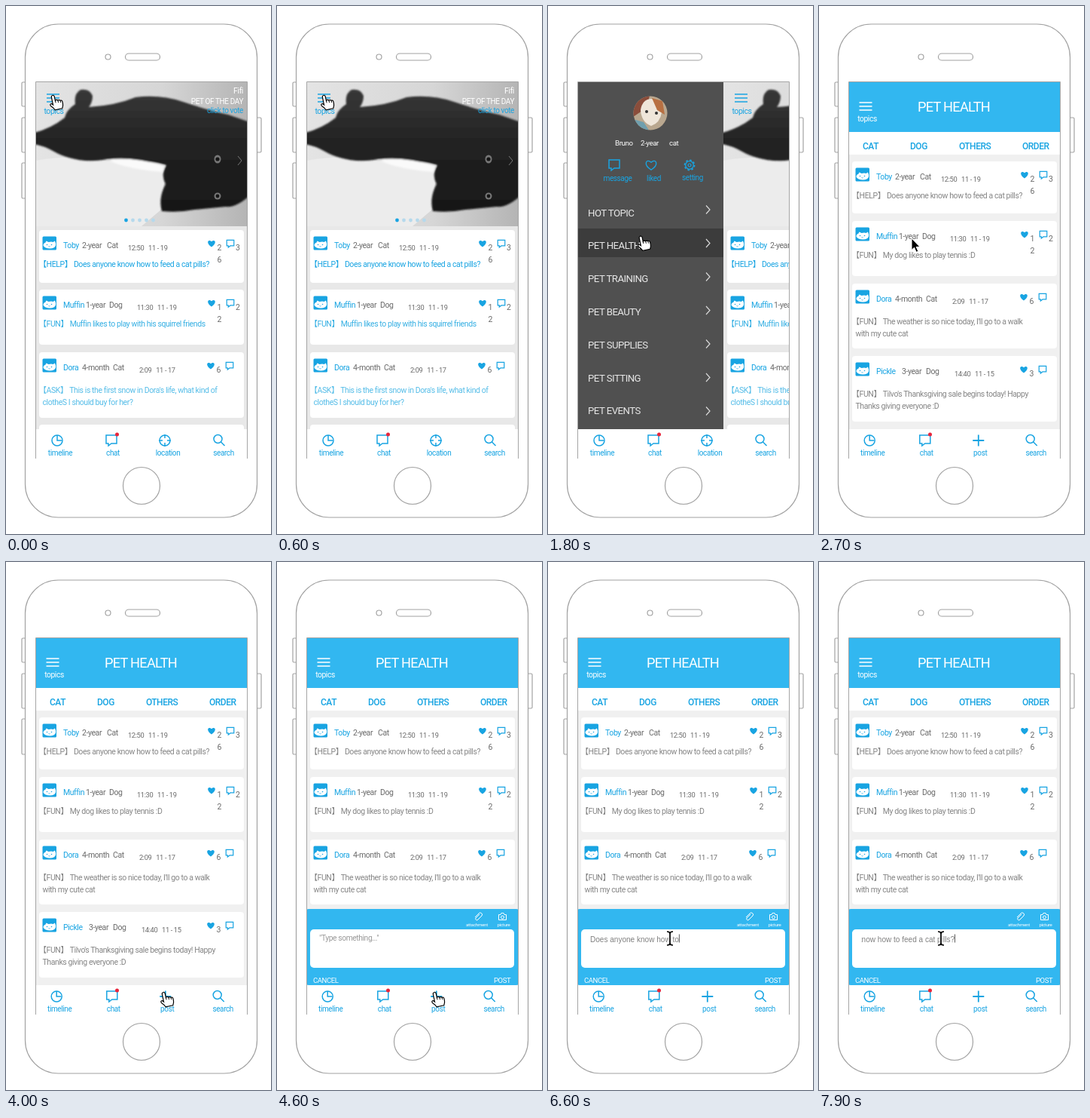
These frames come from a looping animation (352x700 px, 8000 ms). An HTML page:

```html
<!DOCTYPE html>
<html lang="en">
<head>
<meta charset="utf-8">
<title>Pet community app</title>
<style>
  html, body { margin: 0; width: 100%; height: 100%; overflow: hidden; background: #fff; }
  svg { display: block; width: 352px; height: 700px; }
  text { font-family: Roboto, "Noto Sans CJK SC", "Noto Sans CJK JP", sans-serif; letter-spacing: -.04em; white-space: pre; }
  .typed { font-family: "Liberation Sans", Arial, sans-serif; letter-spacing: 0; }
</style>
</head>
<body>
<svg id="stage" viewBox="0 0 352 700" xmlns="http://www.w3.org/2000/svg"></svg>
<script>
const LOOP = 8000, MENU_WIDTH = 194;
const BLUE = '#18a4e2', SKY = '#32b7f0', GREY = '#6a6a6a';
const QUESTION = 'Does anyone know how to feed a cat pills?';

const text = (x, y, str, fill = BLUE, size = 10.5, attrs = '') =>
  `<text x="${x}" y="${y}" fill="${fill}" font-size="${size}" ${attrs}>${str}</text>`;
const centred = (x, y, str, fill, size) => text(x, y, str, fill, size, 'text-anchor="middle"');
const box = (x, y, w, h, fill, r = 0) =>
  `<rect x="${x}" y="${y}" width="${w}" height="${h}" rx="${r}" fill="${fill}"/>`;
const line = (d, stroke = BLUE, width = 1.5) =>
  `<path d="${d}" fill="none" stroke="${stroke}" stroke-width="${width}"/>`;
const shape = (d, fill) => `<path d="${d}" fill="${fill}"/>`;
const disc = (x, y, r, fill) => `<circle cx="${x}" cy="${y}" r="${r}" fill="${fill}"/>`;
const ring = (x, y, r, stroke = BLUE, width = 1.5) =>
  `<circle cx="${x}" cy="${y}" r="${r}" fill="none" stroke="${stroke}" stroke-width="${width}"/>`;
const at = (x, y, body, scale = 1) => `<g transform="translate(${x} ${y}) scale(${scale})">${body}</g>`;

const HEART = 'M0 5C-9-1-5-7.5 0-3 5-7.5 9-1 0 5Z';
const BUBBLE = 'M-7-6H7V5H0L-4 8V5H-7Z';

const burger = (x, y, stroke) => line(`M${x} ${y}h17m-17 5h17m-17 5h17`, stroke, 1.6);

const face = box(0, 0, 18.5, 18, BLUE, 1.5) +
  shape('M1 12Q1 9 4 8L5 6 8 7.5Q12 6.5 14 7.5L16.5 6Q18 9 17.5 12 16 16 10 16 3 16 1 12Z', '#fff') +
  disc(6, 11, .8, BLUE) + disc(12, 11, .8, BLUE) + line('M8 13q1 1 2 0', BLUE, .8);

function card(top, height, post, fill) {
  const [name, age, ageX, kind, kindX, time, timeX, likes, comments, ...lines] = post;
  const first = top + (lines.length > 1 ? 54 : 49);
  const heartX = likes.length > 1 ? 273 : 272;
  return box(44, top, 272, height, '#fff', 4) +
    at(48.5, top + 8.5, face) +
    text(76, top + 23.5, name) +
    text(ageX, top + 23.5, age, GREY) + text(kindX, top + 23.5, kind, GREY) +
    text(timeX, top + 26.5, time, GREY, 9.3) +
    at(heartX, top + 18, shape(HEART, BLUE), .9) +
    [...likes].map((digit, i) => text(heartX + 7.5, top + 27 + i * 16, digit, GREY)).join('') +
    at(heartX + 25, top + 17.5, line(BUBBLE, BLUE, 1.8), .68) +
    text(305, top + 27, comments, GREY) +
    lines.map((str, i) => text(i ? 48.5 : 43.5, first + i * 16, str, fill)).join('');
}

const toby = ['Toby', '2-year', 101, 'Cat', 134, '12:50   11 - 19', 162, '26', '3'];
const muffin = ['Muffin', '1-year', 106, 'Dog', 137, '11:30   11 - 19', 174, '12', '2'];
const dora = ['Dora', '4-month', 101, 'Cat', 142, '2:09   11 - 17', 177, '6', ''];
const pickle = ['Pickle', '3-year', 110, 'Dog', 142, '14:40   11 - 15', 180, '3', ''];

const photo = `<g clip-path="url(#photo)">` +
  box(39, 101, 282, 191, 'url(#sheet)') +
  shape('M39 205Q90 196 130 205L212 216 206 270 180 292H39Z', '#ececec') +
  `<g filter="url(#soft)">` +
  shape('M30 170Q58 164 78 148 80 138 92 130 90 116 99 111 111 109 115 119 115 128 110 134 145 132 172 121 205 117 235 127 268 138 295 144L330 156V245Q308 268 292 266L250 270Q230 274 207 272 202 255 212 236 205 224 213 211C185 203 160 208 134 203 105 209 80 202 64 193Q48 184 30 182Z', 'url(#fur)') +
  shape('M134 204Q165 199 211 212L207 220Q160 216 134 204Z', '#fafafa') +
  `</g>` +
  `<ellipse cx="281" cy="203" rx="4.5" ry="5.5" fill="#777"/><ellipse cx="281" cy="252" rx="4.5" ry="4.5" fill="#777"/>` +
  disc(281, 203, 2.6, '#151515') + disc(281, 252, 2.4, '#151515') +
  `</g>` + line('M308 199l5 6-5 6', '#777', 1) +
  [0, 1, 2, 3, 4].map(i => disc(159.5 + i * 9, 284, 2.4, i ? '#b5d9ec' : BLUE)).join('') +
  text(315, 116, 'Fifi', '#fff', 10.5, 'text-anchor="end"') +
  text(315, 129.5, 'PET OF THE DAY', '#fff', 10, 'text-anchor="end"') +
  text(315, 142, 'click to vote', BLUE, 10, 'text-anchor="end"');

const home = box(39, 101, 282, 499, '#e8e8e8') + photo +
  burger(54, 117, BLUE) + centred(63.5, 143, 'topics') +
  card(297, 70, [...toby, '【HELP】 ' + QUESTION], BLUE) +
  card(376, 73, [...muffin, '【FUN】 Muffin likes to play with his squirrel friends'], '#35afe3') +
  card(459, 87, [...dora, "【ASK】 This is the first snow in Dora's life, what kind of", 'clotheS I should buy for her?'], '#55bde8') +
  box(44, 555, 272, 20, '#fff', 4);

const gear = ring(0, 0, 5.3, BLUE, 1.3) + ring(0, 0, 2, BLUE, 1.2) +
  `<circle r="6.6" fill="none" stroke="${BLUE}" stroke-width="1.6" stroke-dasharray="2.6 2.58"/>`;
const rowY = i => 295 + (i - 1) * 43.8;
const menuItems = ['HOT TOPIC', 'PET HEALTH', 'PET TRAINING', 'PET BEAUTY', 'PET SUPPLIES', 'PET SITTING', 'PET EVENTS'];

const menu = box(39, 101, MENU_WIDTH, 461, '#505050') +
  `<rect id="hover" x="39" width="${MENU_WIDTH}" height="38" fill="#3c3c3c"/>` +
  `<g clip-path="url(#avatar)">` + box(113, 119, 46, 46, '#b9a78f') +
  shape('M113 119h22l-4 16-18 12Z', '#8a4d3b') +
  shape('M123 138q2-14 14-15 13 3 14 18-2 14-14 18-13-5-14-21Z', '#efe6da') +
  shape('M138 122l14 4 3 18-10-6Z', '#b87042') +
  shape('M113 150l14 4 8 12h-22Z', '#6f9fae') + disc(131, 140, 2, '#333') + disc(144, 142, 2, '#333') + `</g>` +
  text(89, 184.5, 'Bruno', '#fff', 9.7) + text(123, 184.5, '2-year', '#fff', 9.7) + text(161, 184.5, 'cat', '#fff', 9.7) +
  at(88, 210, line(BUBBLE)) + at(137, 211, line(HEART, BLUE, 1.1), 1.25) + at(188, 211, gear) +
  centred(92.5, 231.5, 'message', BLUE, 10) + centred(140.5, 231.5, 'liked', BLUE, 10) + centred(192, 230.5, 'setting', BLUE, 10) +
  menuItems.map((label, i) =>
    text(53, 278.5 + i * 43.8, label, '#e6e6e6', 13.2) +
    line(`M210 ${264.5 + i * 44.5}l5 5.5-5 5.5`, '#d8d8d8', 1.2)).join('');

const locate = ring(0, 0, 7) + line('M0-8v5M0 3v5M-8 0h5M3 0h5');
const plus = line('M0-7.5v15M-7.5 0h15', BLUE, 1.8);

const nav = (shift, icon, label) => box(39, 561, 282, 40, '#fff') +
  at(68 - shift, 576, ring(0, 0, 7) + line('M0-7V0H6')) +
  at(140 + shift, 575, line(BUBBLE)) + disc(147.5, 568, 2.5, '#e8263c') +
  at(211 + shift, 576, icon) +
  at(282.5 - shift, 575, ring(-1, -1, 5.5) + line('M3 3l5 5')) +
  [[72 - shift, 'timeline'], [142 + shift, 'chat'], [215 - shift, label], [289 - shift, 'search']]
    .map(([x, str]) => centred(x, 596, str, BLUE, 10)).join('');

const tabs = [[58, 'CAT'], [121, 'DOG'], [186, 'OTHERS'], [270, 'ORDER']];
const health = box(39, 101, 282, 500, '#f0f0f0') + box(39, 101, 282, 66, SKY) + box(39, 167, 282, 30, '#fff') +
  burger(53.5, 128, '#fff') + centred(64, 153, 'topics', '#fff', 10.3) +
  centred(179, 139.5, 'PET HEALTH', '#fff', 18.2) +
  tabs.map(([x, label]) => text(x, 190, label, BLUE, 12, 'font-weight="500"')).join('') +
  card(206, 69, [...toby, '【HELP】 ' + QUESTION], '#858585') +
  card(285, 73, [...muffin, '【FUN】 My dog likes to play tennis :D'], '#858585') +
  card(368, 86, [...dora, "【FUN】 The weather is so nice today, I'll go to a walk", 'with my cute cat'], '#858585') +
  card(464, 87, [...pickle, "【FUN】 Tilvo's Thanksgiving sale begins today! Happy", 'Thanks giving everyone :D'], '#858585');

const panel = box(39, 460, 282, 101, SKY, 3) + box(44, 487, 271, 51, '#fff', 5) +
  at(267, 470, line('M2-3l-5 5a1.6 1.6 0 0 0 3 2l5-5a2.5 2.5 0 0 0-4-3l-5 5', '#fff', 1)) +
  line('M294.5 467.5h2.5l1-2h3l1 2h2.5v7h-10Z', '#fff', 1) + ring(299.5, 471, 2, '#fff', 1) +
  centred(265.5, 482.5, 'attachment', '#fff', 6.2) + centred(301, 482.5, 'picture', '#fff', 6.2) +
  text(48, 558, 'CANCEL', '#fff', 9.5) + text(288, 558, 'POST', '#fff', 9.5) +
  `<text id="hint" x="56" y="502" fill="#999" font-size="10.3">"Type something..."</text>` +
  `<g clip-path="url(#field)"><text id="typed" class="typed" y="504" fill="#808080" font-size="10.05"></text></g>` +
  `<path id="caret" stroke="#333" stroke-width=".8"/>`;

const outline = (x, y, w, h, r) =>
  `<rect x="${x}" y="${y}" width="${w}" height="${h}" rx="${r}" fill="#fff" stroke="#a2a2a2" stroke-width="1.2"/>`;
const phone = [[21, 101, 32], [21, 148, 46], [21, 208, 47], [333, 148, 46]]
    .map(([x, y, h]) => outline(x, y, 6, h, 1.5)).join('') +
  outline(25.5, 24, 308, 654, 44) + outline(158.5, 63, 46, 9, 4.5) +
  ring(135.5, 67.5, 3.5, '#a2a2a2', 1.2) + ring(180, 636, 24.5, '#a2a2a2', 1.2);

const pointers = {
  hand: `<g transform="translate(-1 0) rotate(-12)"><path d="M-2 1.5a2 2 0 0 1 4 0V7q2-1.5 3.5 .5 2-1 3 .8 2.5-.5 2.5 2V13q0 3-2 6H-1q-1-3-4-6-1.5-2.5 .5-3 1.2 0 2.5 1.8Z" fill="#fff" stroke="#000" stroke-width="1.2"/>` +
    line('M2 7v3M5.5 8v2.5M8.5 9v2', '#000', .9) + `</g>`,
  arrow: `<path d="M0 0V15.5L3.5 12.3 6.2 18.3 8.8 17.2 6.2 11.4H11Z" fill="#000" stroke="#fff" stroke-width="1"/>`,
  beam: [['#fff', 3.4], ['#000', 1.7]].map(([c, w]) =>
    line('M-4-9Q0-9 0-6 0-9 4-9M0-7V7M-4 9Q0 9 0 6 0 9 4 9', c, w)).join('')
};

const clip = (id, body) => `<clipPath id="${id}">${body}</clipPath>`;
const stage = document.getElementById('stage');
stage.innerHTML = `<defs>
  <linearGradient id="sheet"><stop stop-color="#e4e4e4"/><stop offset=".6" stop-color="#d6d6d6"/><stop offset="1" stop-color="#b4b4b4"/></linearGradient>
  <linearGradient id="fur" x2="0" y2="1"><stop stop-color="#383838"/><stop offset=".45" stop-color="#222"/><stop offset="1" stop-color="#181818"/></linearGradient>
  <filter id="soft"><feGaussianBlur stdDeviation="1"/></filter>
  ${clip('screen', box(39, 100, 282, 501, '#000'))}${clip('photo', box(39, 101, 282, 191, '#000'))}
  ${clip('avatar', disc(136, 142, 22.5, '#000'))}${clip('field', box(56, 490, 126, 20, '#000'))}</defs>` +
  phone +
  `<g clip-path="url(#screen)"><g id="home">${home}</g><g id="menu">${menu}</g>${nav(0, locate, 'location')}
  <g id="health">${health}<g id="panel">${panel}</g>${nav(.8, plus, 'post')}</g></g>` +
  line('M39.5 600V100.5H320.5V600', '#a5a5a5', 1) +
  `<g id="pointer">${Object.entries(pointers).map(([id, body]) => `<g id="${id}">${body}</g>`).join('')}</g>`;

const el = id => document.getElementById(id);
const show = (id, on) => el(id).setAttribute('visibility', on ? 'visible' : 'hidden');
const move = (id, x, y) => el(id).setAttribute('transform', `translate(${x} ${y})`);
const progress = (t, from, to) => Math.min(1, Math.max(0, (t - from) / (to - from)));
const ease = p => p * p * (3 - 2 * p);

const pointerPath = [[0, 63, 119], [1000, 63, 119], [1600, 124, 305], [2300, 123, 308],
  [2800, 123, 308], [3700, 210, 571], [4600, 210, 571], [5300, 162, 499], [LOOP, 162, 499]];

function pointerAt(t) {
  const i = pointerPath.findIndex(key => key[0] > t);
  const [t0, x0, y0] = pointerPath[i - 1], [t1, x1, y1] = pointerPath[i];
  const p = ease(progress(t, t0, t1));
  return [x0 + (x1 - x0) * p, y0 + (y1 - y0) * p];
}

function pointerKind(t, y) {
  if (t < 2200) return t < 900 || y > 251 ? 'hand' : 'arrow';
  if (y > 561) return 'hand';
  return t > 4600 && y < 537 ? 'beam' : 'arrow';
}

function render(t) {
  const slide = MENU_WIDTH * ease(progress(t, 650, 900));
  move('home', slide, 0);
  move('menu', slide - MENU_WIDTH, 0);
  const dissolve = progress(t, 2000, 2350);
  el('health').setAttribute('opacity', dissolve);
  show('health', dissolve > 0);
  move('panel', 0, 102 * (1 - ease(progress(t, 4150, 4500))));

  const [x, y] = pointerAt(t);
  const kind = pointerKind(t, y);
  move('pointer', x, y);
  for (const id in pointers) show(id, id === kind);
  const row = Math.floor((y - rowY(0)) / 43.8);
  show('hover', t < 2350 && row >= 0);
  el('hover').setAttribute('y', rowY(Math.max(0, row)));

  const count = Math.floor(QUESTION.length * progress(t, 5500, 7400));
  el('typed').textContent = QUESTION.slice(0, count);
  const width = count ? el('typed').getComputedTextLength() : 0;
  el('typed').setAttribute('x', 56 - Math.max(0, width - 124));
  el('hint').setAttribute('opacity', count ? 0 : 1);
  const caretX = count ? 56.5 + Math.min(width, 124) : 134.5;
  el('caret').setAttribute('d', `M${caretX} 493.5v11`);
  show('caret', t > 5300);
}

function tick(now) {
  render(now % LOOP);
  requestAnimationFrame(tick);
}
render(0);
requestAnimationFrame(tick);
</script>
</body>
</html>
```
